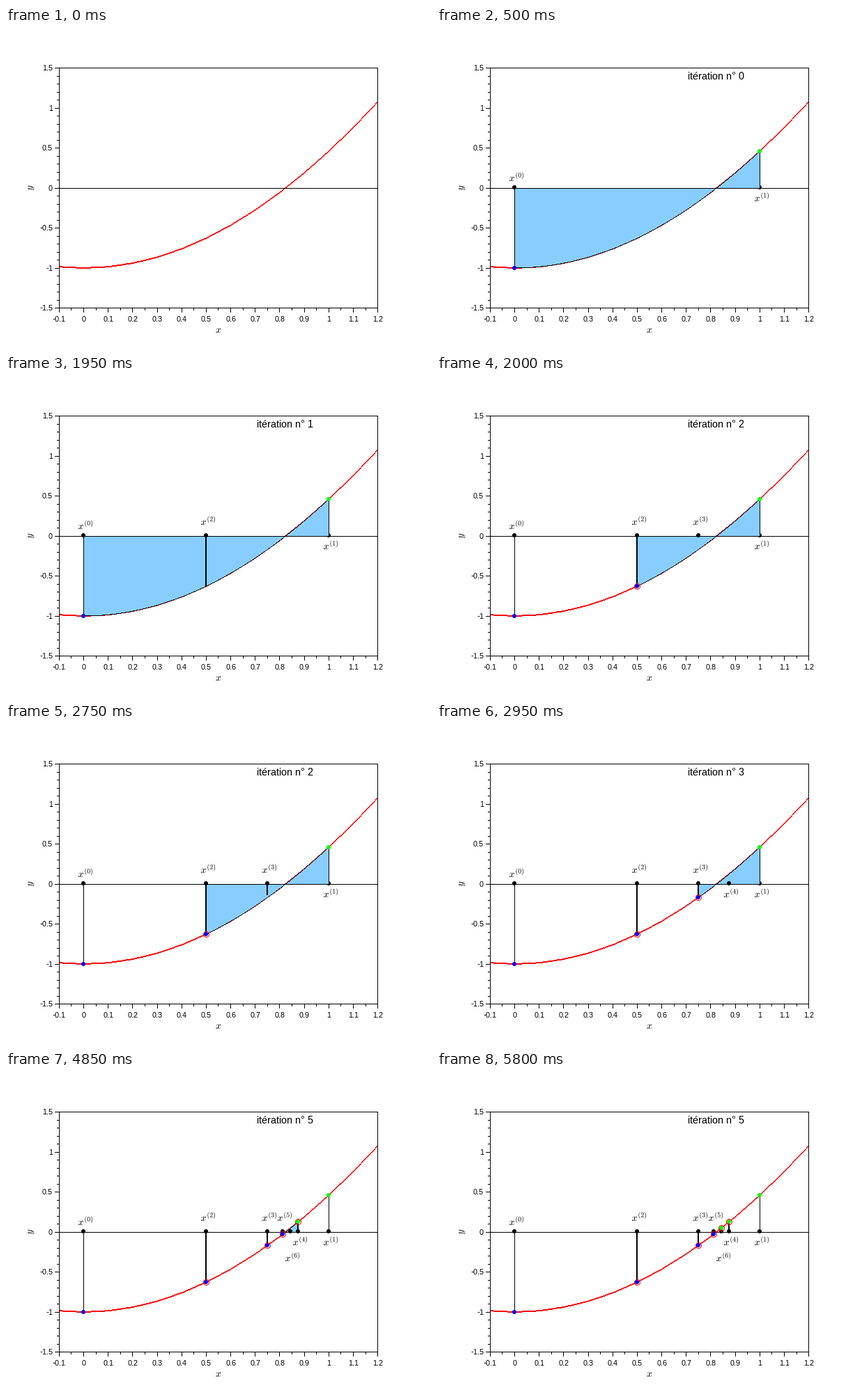
Recreate the animation shown at these times as a matplotlib script. Size 610 by 460 pixels, loop 6.35 s.

```python
import numpy as np
import matplotlib.pyplot as plt
from matplotlib.animation import FuncAnimation
from matplotlib.patches import Circle, PathPatch, Polygon
from matplotlib.textpath import TextPath
from matplotlib.transforms import Affine2D

W, H, DPI = 610, 460, 72          # at 72 dpi one point is one pixel
INTERVAL, FRAMES = 50, 127
SETUP, FIRST, STEP = 10, 21, 19   # frames: bracket shown, first split, split length
SPLITS = 5
SKY = "#87ceff"

plt.rcParams.update({
    "font.family": "Liberation Sans",
    "mathtext.fontset": "cm",
    "text.hinting": "native",
    "text.hinting_factor": 1,
})


def f(x):
    return x ** 2 - np.cos(x)


def px(x):
    return W * (0.125 + 0.75 * (x + 0.1) / 1.3)


def py(y):
    return H * (0.5 - 0.25 * y)


def bisect():
    """Return the successive abscissae and the bracket of each iteration."""
    a, b = 0.0, 1.0
    points, brackets = [a, b], [(a, b)]
    for _ in range(SPLITS):
        brackets.append((a, b))
        m = (a + b) / 2
        points.append(m)
        a, b = (m, b) if f(m) < 0 else (a, m)
    return points, brackets


fig = plt.figure(figsize=(W / DPI, H / DPI), dpi=DPI, facecolor="white")
ax = fig.add_axes([0, 0, 1, 1])
ax.set(xlim=(0, W), ylim=(H, 0))
ax.axis("off")


def line(xs, ys, lw=1):
    return ax.plot(xs, ys, color="black", lw=lw, zorder=3, antialiased=False,
                   snap=False, solid_capstyle="butt")[0]


def hline(x0, x1, y):
    return line([x0, x1], [np.floor(y + 1e-6) + 0.5] * 2)


def vline(x, y0, y1):
    return line([np.ceil(x - 1e-6) - 0.5] * 2, [y0, y1])


def columns(a, b):
    """Left edges of the pixel columns between two abscissae."""
    return np.arange(round(px(a)), round(px(b)))


def stairs(cols, top, bottom):
    """Outline of one whole-pixel bar per column."""
    xs = np.column_stack([cols, cols + 1]).ravel()
    upper = np.column_stack([xs, np.repeat(top, 2)])
    lower = np.column_stack([xs, np.repeat(bottom, 2)])
    return np.vstack([upper, lower[::-1]])


def shape(color, z):
    return ax.add_patch(Polygon([(0, 0), (1, 0), (1, 1)], fc=color, lw=0, zorder=z,
                                antialiased=False, snap=False))


def dot(x, y, color, z=6):
    return ax.add_patch(Circle((np.floor(x), np.floor(y)), 3, fc=color, lw=0, zorder=z))


def ring(x, y):
    center = np.floor(x) + 0.5, np.floor(y) + 0.5
    return ax.add_patch(Circle(center, 4, fc="none", ec="red", lw=1, zorder=5))


def math(x, y, s, angle=0):
    pose = Affine2D().rotate_deg(angle).scale(1, -1).translate(x, y)
    glyphs = TextPath((0, 0), f"${s}$", size=14)
    return ax.add_patch(PathPatch(glyphs, fc="black", lw=0, zorder=7,
                                  transform=pose + ax.transData))


def draw_frame():
    left, right, top, bottom = px(-0.1), px(1.2), py(1.5), py(-1.5)
    for y in (top, py(0), bottom):
        hline(np.floor(left), np.floor(right) + 1, y)
    for x in (left, right):
        vline(x, np.floor(top), np.floor(bottom) + 1)

    for k in range(27):
        x, major = px(-0.1 + 0.05 * k), k % 2 == 0
        vline(x, 403, 409 if major else 406)
        if major:
            ax.text(x, 422, f"{round(0.05 * k - 0.1, 1):g}", fontsize=11, ha="center")
    for k in range(31):
        y, major = py(-1.5 + 0.1 * k), k % 5 == 0
        hline(70 if major else 73, 76, y)
        if major:
            ax.text(67, np.floor(y + 1e-6) + 4, f"{(k - 15) / 10:g}",
                    fontsize=11, ha="right")
    math(301, 438, "x")
    math(37.5, 233.5, "y", 90)

    knots = np.linspace(-0.1, 1.2, 14)
    cols = columns(-0.1, 1.2)
    top = np.round(np.interp(cols + 0.5, px(knots), py(f(knots))) - 1)
    shape("red", 1).set_xy(stairs(cols, top, top + 2))


draw_frame()
points, brackets = bisect()
title = ax.text(360, 74, "", fontsize=15)
area = shape(SKY, 2)
edge = shape("black", 2.5)

BASELINES = [220, 249, 214, 214, 249, 214, 272]
marks, stems, ends = [], [], []
for n, x in enumerate(points):
    cx, cy = px(x), py(f(x))
    marks.append([dot(cx, 229, "black", z=1.5 if n == 1 else 4),
                  math(np.floor(cx) - 7.4, BASELINES[n], f"x^{{({n})}}")])
    ends.append([dot(cx, cy, "blue" if f(x) < 0 else "lime")])
    if n < 2:
        stems.append(vline(cx, py(0), np.round(cy)))
    else:
        stems.append(line([np.floor(cx)] * 2, [py(0), cy], lw=2))
        ends[n].append(ring(cx, cy))


def start(n):
    """Frame at which iteration n begins."""
    return SETUP if n == 0 else FIRST + STEP * (n - 1)


def update(i):
    n = -1 if i < SETUP else 0 if i < FIRST else min((i - FIRST) // STEP + 1, SPLITS)
    title.set_text(f"itération n° {n}" if n >= 0 else "")

    active = 0 <= n and i < start(SPLITS + 1)
    area.set_visible(active)
    edge.set_visible(active)
    if active:
        cols = columns(*brackets[n])
        xs = (cols + 0.5 - px(0)) / (px(1) - px(0))
        row = np.floor(py(f(xs)))
        area.set_xy(stairs(cols, row, np.full_like(row, py(0))))
        edge.set_xy(stairs(cols, row, row + 1))

    for k, x in enumerate(points):
        born = start(max(k - 1, 0))
        done = start(k) if k > 1 else SETUP
        for art in marks[k] + [stems[k]]:
            art.set_visible(i >= born)
        for art in ends[k]:
            art.set_visible(i >= done)
        if k > 1:
            grown = np.clip((i - born + 1) / STEP, 0, 1)
            stems[k].set_ydata([py(0), np.round(py(f(x) * grown))])


anim = FuncAnimation(fig, update, frames=FRAMES, interval=INTERVAL,
                     repeat=True, repeat_delay=0)
plt.show()
```
